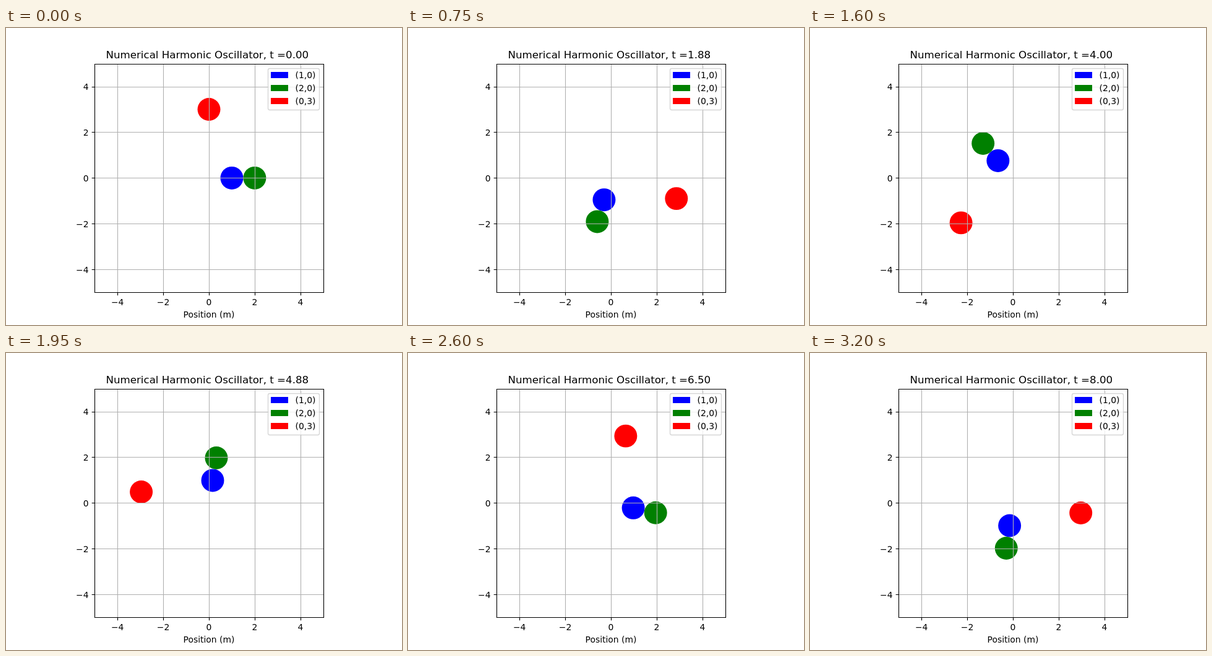
Recreate the animation shown at these times as an HTML page. Size 640 by 480 pixels, loop 3250 ms.

```html
<!DOCTYPE html>
<html>
<head>
<meta charset="utf-8">
<style>
html, body { margin: 0; width: 100%; height: 100%; overflow: hidden; background: #fff; }
svg { display: block; font: 13.89px "DejaVu Sans", sans-serif; }
.mid { text-anchor: middle; }
.end { text-anchor: end; }
</style>
</head>
<body>
<svg id="plot" width="640" height="480" viewBox="0 0 640 480"></svg>
<script>
const STEP = 50, FRAMES = 65, DT = 0.125;
const UNIT = 36.96, CX = 328, CY = 242.4;
const LEFT = 143.5, RIGHT = 513.5, TOP = 58.5, BOTTOM = 427.5;
const plot = document.getElementById('plot');

// Each ball starts at (x, y) and turns clockwise about the centre.
const balls = [
  { x: 1, y: 0, color: '#00f' },
  { x: 2, y: 0, color: '#008000' },
  { x: 0, y: 3, color: '#f00' }
];

function add(tag, attrs, text = '') {
  const el = document.createElementNS('http://www.w3.org/2000/svg', tag);
  for (const name in attrs) el.setAttribute(name, attrs[name]);
  el.textContent = text;
  return plot.appendChild(el);
}
const label = (text, x, y, cls = '') => add('text', { x, y, class: cls }, text);
const line = (d, stroke) => add('path', { d, stroke, 'stroke-width': 1.11, fill: 'none' });
const snap = v => Math.floor(v + 0.5) + 0.5;

for (const ball of balls) ball.el = add('circle', { r: UNIT / 2, fill: ball.color });

const marks = [-4, -2, 0, 2, 4];
for (const v of marks) {
  line(`M${snap(CX + v * UNIT)} ${TOP}V${BOTTOM}M${LEFT} ${snap(CY - v * UNIT)}H${RIGHT}`, '#b0b0b0');
}
for (const v of marks) {
  const x = CX + v * UNIT, y = CY - v * UNIT;
  const name = String(v).replace('-', '\u2212');
  line(`M${snap(x)} ${BOTTOM}v4.86M${LEFT} ${snap(y)}h-4.86`, '#000');
  label(name, x, 448, 'mid');
  label(name, 133.5, Math.round(y + 5.28), 'end');
}
line(`M${LEFT} ${TOP}H${RIGHT}V${BOTTOM}H${LEFT}Z`, '#000');
label('Position (m)', CX, 468, 'mid');
const title = label('', 325.35, 49, 'mid');
title.style.fontSize = '16.67px';

add('rect', {
  x: 423.5, y: 65.5, width: 83, height: 67, rx: 2.78,
  fill: '#fff', 'fill-opacity': 0.8,
  stroke: '#ccc', 'stroke-opacity': 0.8, 'stroke-width': 1.39
});
balls.forEach(({ x, y, color }, i) => {
  add('rect', { x: 428, y: 71 + 21 * i, width: 28, height: 10, fill: color });
  label(`(${x},${y})`, 467.5, 81 + 21 * i);
});

function draw() {
  const k = Math.floor(performance.now() / STEP) % FRAMES;
  const t = k * DT, c = Math.cos(t), s = Math.sin(t);
  for (const { x, y, el } of balls) {
    el.setAttribute('cx', CX + UNIT * (x * c + y * s));
    el.setAttribute('cy', CY - UNIT * (y * c - x * s));
  }
  // Ties round to the even digit.
  const clock = (k % 4 === 1 ? t - 0.001 : t).toFixed(2);
  title.textContent = `Numerical Harmonic Oscillator, t =${clock}`;
  requestAnimationFrame(draw);
}
draw();
</script>
</body>
</html>
```
